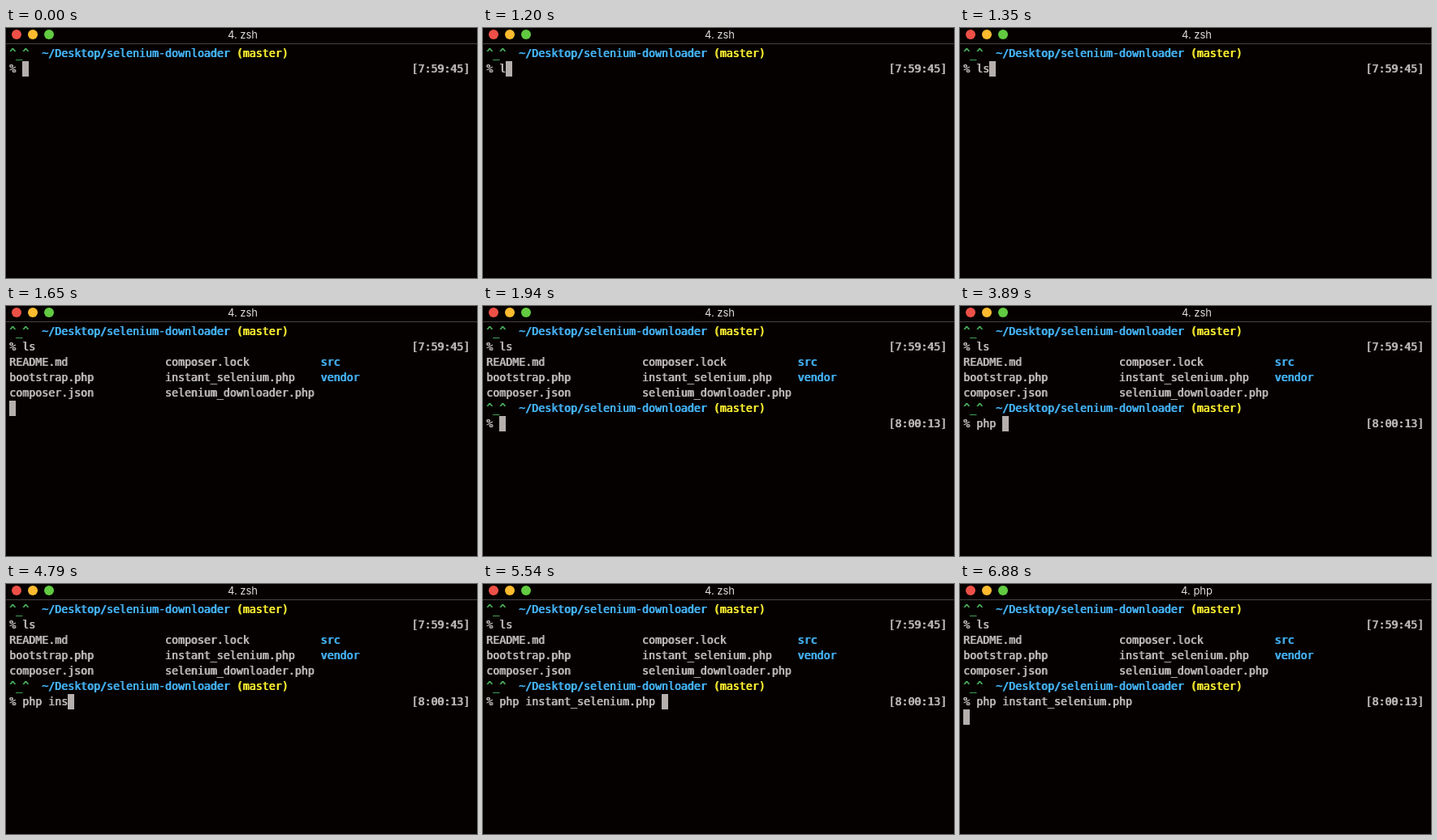
These frames come from a looping animation (580 px wide and 309 px high, 8000 ms). An HTML page:

```html
<!DOCTYPE html>
<html lang="en">
<head>
<meta charset="utf-8">
<style>
html, body { margin: 0; width: 100%; height: 100%; overflow: hidden; background: #050100; }
i, #title, #rule, #screen, #cursor { position: absolute; }
i { top: 2px; width: 12px; height: 12px; border-radius: 50%; }
#title { left: 191.5px; width: 200px; top: 0; text-align: center; font: 13px/17px Inter, sans-serif; color: #dedbda; }
#rule { left: 0; top: 19px; width: 100%; height: 1px; background: #4b4343; }
#screen {
  left: 4px; top: 22px; margin: 0; color: #bbb6b5;
  font: 13.288px/19px "DejaVu Sans Mono", monospace;
  -webkit-text-stroke: .2px; text-shadow: .8px 0 currentColor;
  font-variant-ligatures: none;
}
#screen span { text-shadow: .8px 0 currentColor; }
#cursor { width: 8px; height: 19px; background: #b5afae; }
.green { color: #4bb05d; }
.blue { color: #45b3f5; }
.yellow { color: #fcf032; }
</style>
</head>
<body>
<i style="left:7px;background:#ee5047"></i>
<i style="left:27px;background:#fdbb2f"></i>
<i style="left:47px;background:#62cb41"></i>
<div id="title"></div>
<div id="rule"></div>
<div id="cursor"></div>
<pre id="screen"></pre>
<script>
const LOOP = 8000;
const $ = id => document.getElementById(id);
const paint = (color, text) => `<span class="${color}">${text}</span>`;

const prompt = paint('green', '^_^') + '  ' +
  paint('blue', '~/Desktop/selenium-downloader') + ' ' + paint('yellow', '(master)');
const inputLine = (text, clock) => ('% ' + text).padEnd(62) + `[${clock}]`;
const fileRow = (a, b, dir = '') => a.padEnd(24) + b.padEnd(24) + paint('blue', dir);
const files = [
  fileRow('README.md', 'composer.lock', 'src'),
  fileRow('bootstrap.php', 'instant_selenium.php', 'vendor'),
  fileRow('composer.json', 'selenium_downloader.php')
];

// [time, number of characters typed]
const first = { text: 'ls', keys: [[1200, 1], [1350, 2]] };
const second = {
  text: 'php instant_selenium.php ',
  keys: [[3290, 1], [3590, 3], [3890, 4], [4190, 5], [4490, 6],
         [4790, 7], [5090, 8], [5240, 9], [5540, 25]]
};
const typed = ({ text, keys }, t) =>
  text.slice(0, keys.reduce((n, [at, count]) => t >= at ? count : n, 0));

function render(t) {
  const a = typed(first, t), b = typed(second, t);
  const lines = [prompt, inputLine(a, '7:59:45')];
  let row = 1, col = 2 + a.length;
  if (t >= 1650) {
    lines.push(...files);
    [row, col] = [5, 0];
  }
  if (t >= 1940) {
    lines.push(prompt, inputLine(b, '8:00:13'));
    [row, col] = t < 6280 ? [6, 2 + b.length] : [7, 0];
  }
  $('title').textContent = t < 6880 ? '4. zsh' : '4. php';
  $('screen').innerHTML = lines.join('\n');
  $('cursor').style.left = 4 + 8 * col + 'px';
  $('cursor').style.top = 22 + 19 * row + 'px';
}

const start = performance.now();
function tick() {
  render((performance.now() - start) % LOOP);
  requestAnimationFrame(tick);
}
tick();
</script>
</body>
</html>
```
